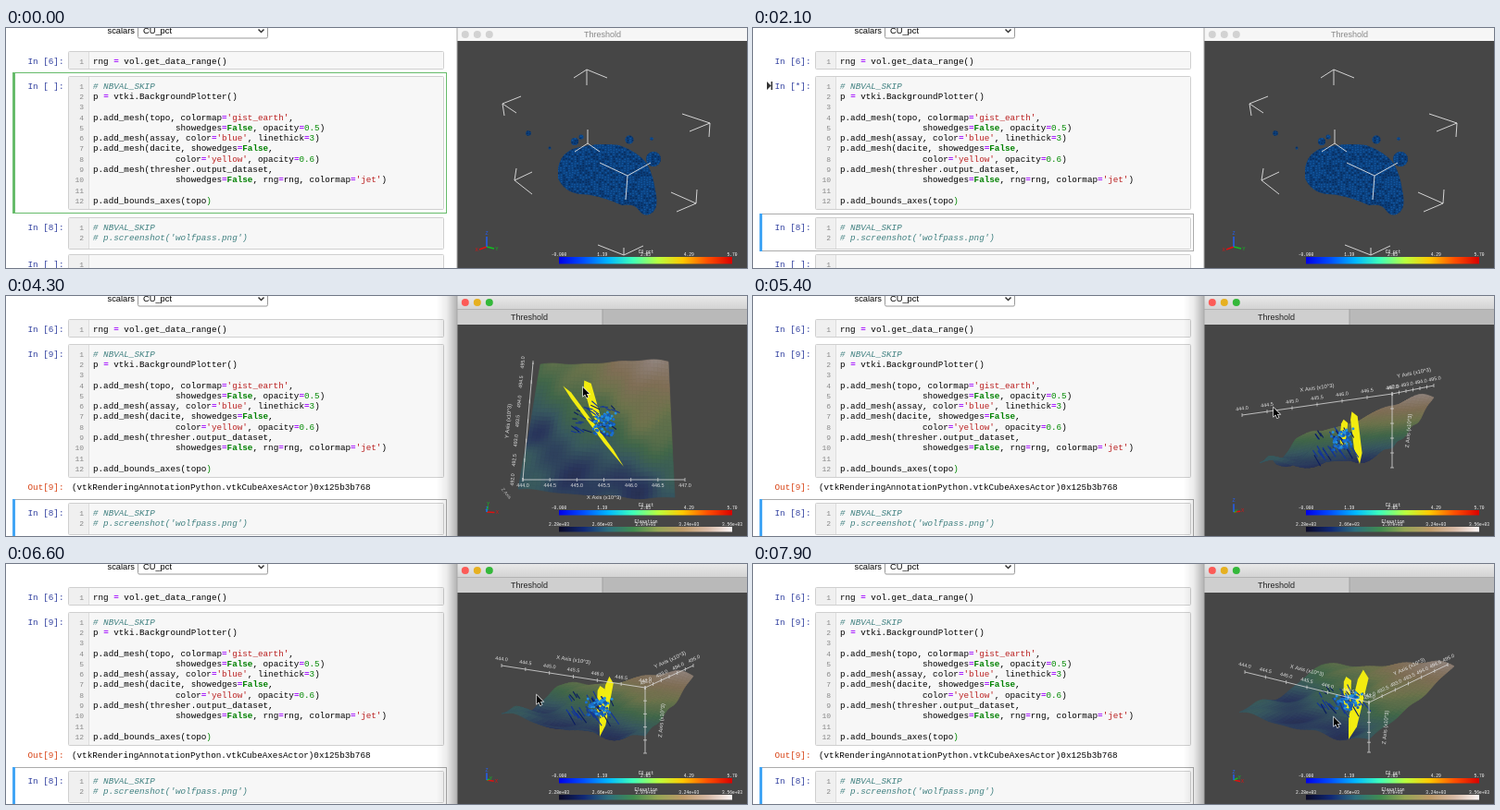
Recreate the animation shown at these times as an HTML page with a canvas. Size 800 by 260 pixels, loop 8 s.

```html
<!DOCTYPE html>
<html lang="en">
<head>
<meta charset="utf-8">
<title>Notebook and 3D plot</title>
<style>
html, body { margin: 0; width: 100%; height: 100%; overflow: hidden; background: #fff; }
svg, canvas { position: absolute; left: 0; top: 0; width: 800px; height: 260px; }
text { white-space: pre; font: 9.27px "Liberation Mono", monospace; }
.ui { font: 9.3px "Liberation Sans", sans-serif; }
.num { font-size: 8px; fill: #888; text-anchor: end; }
.prompt { fill: #303f9f; text-anchor: end; }
.comment { fill: #408080; font-style: italic; }
.string { fill: #ba2121; }
.op { fill: #a2f; font-weight: bold; }
.word { fill: #008000; font-weight: bold; }
.digit, .match { fill: #080; }
</style>
</head>
<body>
<svg id="page" viewBox="0 0 800 260"></svg>
<canvas id="view" width="800" height="260"></canvas>
<script>
const LOOP = 8000, RUN = 500, DONE = 2500, TAB = 2800, FOCUS = 3700;
const page = document.getElementById('page');
const ctx = document.getElementById('view').getContext('2d');
const get = id => document.getElementById(id);
const clamp = (x, a = 0, b = 1) => Math.min(b, Math.max(a, x));
const mix = (a, b, w) => Array.isArray(a) ? a.map((v, i) => mix(v, b[i], w)) : a + (b - a) * w;

// ---------- notebook ----------
function highlight(line) {
  if (line[0] === '#') return `<tspan class="comment">${line}</tspan>`;
  const rule = /('[^']*')|(=)|(\bFalse\b)|(\b\d+(?:\.\d+)?\b)/g;
  const kinds = ['string', 'op', 'word', 'digit'];
  return line.replace(rule, (m, ...g) =>
    `<tspan class="${kinds[g.findIndex(x => x)]}">${m}</tspan>`);
}

function cell(top, height, lines, prompt, id) {
  const base = top + 13.8;
  let s = `<rect x="67.5" y="${top + .5}" width="405" height="${height}" rx="1" fill="#f7f7f7" stroke="#cfcfcf"/>
    <rect x="68" y="${top + 1}" width="21" height="${height - 1}" fill="#f0f0f0"/>
    <path d="M89.5 ${top + 1}v${height - 1}" stroke="#ddd"/>
    <text class="prompt" x="62.5" y="${base}" ${id ? `id="${id}"` : ''}>${prompt}</text>`;
  lines.forEach((line, i) => {
    const y = base + i * 11.28;
    s += `<text class="num" x="84" y="${y}">${i + 1}</text><text x="94" y="${y}">${highlight(line)}</text>`;
  });
  return s;
}

const pad = ' '.repeat(16);
const code = [
  '# NBVAL_SKIP', 'p = vtki.BackgroundPlotter()', '',
  "p.add_mesh(topo, colormap='gist_earth',", pad + 'showedges=False, opacity=0.5)',
  "p.add_mesh(assay, color='blue', linethick=3)",
  'p.add_mesh(dacite, showedges=False,', pad + "color='yellow', opacity=0.6)",
  'p.add_mesh(thresher.output_dataset,', pad + "showedges=False, rng=rng, colormap='jet')",
  '', 'p.add_bounds_axes(topo<tspan class="match">)</tspan>'
];
// the last line carries its own markup, so it bypasses the highlighter's "=" rule
const lastLine = code.pop();

page.innerHTML = `
  <rect width="800" height="260" fill="#fff"/>
  <text class="ui" x="109.5" y="6">scalars</text>
  <rect x="142.5" y="-10" width="140" height="21" rx="1.5" fill="#fff" stroke="#999"/>
  <text class="ui" x="148" y="6">CU_pct</text>
  <path d="M272.5 1.5l3 3 3-3" fill="none" stroke="#333" stroke-width="1.5"/>
  <g id="editing"><rect x="7.5" y="48.5" width="468" height="152" fill="none" stroke="#66bb6a"/>
    <rect x="7" y="48" width="3" height="153" fill="#66bb6a"/></g>
  ${cell(25, 19, ['rng = vol.get_data_range()'], 'In [6]:')}
  ${cell(52, 144, [...code, ''], 'In [ ]:', 'state')}
  <text x="94" y="189.9">${lastLine}</text>
  <path id="runIcon" d="M15 58v9l4.5-4.5zM19.5 58h1.5v9h-1.5z" fill="#333"/>
  <g id="output"><text x="62.5" y="210" text-anchor="end" fill="#d84315">Out[9]:</text>
    <text x="71" y="210">(vtkRenderingAnnotationPython.vtkCubeAxesActor)0x125b3b768</text></g>
  <g id="below">
    <g id="selected"><rect x="7.5" y="201.5" width="468" height="40" fill="none" stroke="#ababab"/>
      <rect x="7" y="201" width="3" height="41" fill="#42a5f5"/></g>
    ${cell(205, 34, ['# NBVAL_SKIP', "# p.screenshot('wolfpass.png')"], 'In [8]:')}
    ${cell(245, 24, [''], 'In [ ]:')}
  </g>`;

const show = (id, on) => get(id).setAttribute('display', on ? 'inline' : 'none');

function drawNotebook(t, mouse) {
  const ran = t >= RUN, done = t >= DONE;
  show('editing', !ran);
  show('selected', ran);
  show('output', done);
  show('runIcon', ran && mouse[0] < 477);
  get('state').textContent = `In [${done ? 9 : ran ? '*' : ' '}]:`;
  get('below').setAttribute('transform', `translate(0 ${done ? 19 : 0})`);
}

// ---------- canvas helpers ----------
function fill(color, x, y, w, h) { ctx.fillStyle = color; ctx.fillRect(x, y, w, h); }

function polygon(color, pts) {
  ctx.fillStyle = color;
  ctx.beginPath();
  pts.forEach(p => ctx.lineTo(p[0], p[1]));
  ctx.closePath();
  ctx.fill();
}

function stroke(color, width, ...pts) {
  ctx.strokeStyle = color;
  ctx.lineWidth = width;
  ctx.beginPath();
  pts.forEach(p => ctx.lineTo(p[0], p[1]));
  ctx.stroke();
}

function dot(x, y, r, color) {
  ctx.fillStyle = color;
  ctx.beginPath();
  ctx.arc(x, y, r, 0, 7);
  ctx.fill();
}

function label(s, x, y, size = 6, color = '#e4e4e4', angle = 0) {
  ctx.save();
  ctx.translate(x, y);
  ctx.rotate(angle);
  ctx.font = `${size}px "Liberation Sans", sans-serif`;
  ctx.textAlign = 'center';
  ctx.textBaseline = 'middle';
  ctx.fillStyle = color;
  ctx.fillText(s, 0, 0);
  ctx.restore();
}

function ramp(colors, x0, y0, x1, y1) {
  const g = ctx.createLinearGradient(x0, y0, x1, y1);
  colors.forEach((c, i) => g.addColorStop(i / (colors.length - 1), c));
  return g;
}

function random(seed) {
  return () => (seed = seed * 16807 % 2147483647) / 2147483647;
}

// ---------- colour maps ----------
const earth = [[10, 10, 40], [16, 40, 118], [45, 110, 125], [64, 140, 80],
  [150, 165, 85], [190, 155, 105], [215, 185, 165], [250, 245, 245]];
const earthCss = earth.map(c => `rgb(${c})`);
const jet = ['#0000e8', '#0050ff', '#00b8ff', '#40ffb8', '#b8ff40', '#ffc800', '#ff5000', '#d80000'];

function earthColor(h) {
  const s = clamp(h) * (earth.length - 1), i = Math.min(earth.length - 2, Math.floor(s));
  return `rgb(${mix(earth[i], earth[i + 1], s - i).map(c => Math.round(c * .5 + 33))})`;
}

function colorBar(y, h, colors, title, ticks) {
  fill(ramp(colors, 597, 0, 784, 0), 597, y, 187, h);
  ctx.font = '4.6px "Liberation Mono", monospace';
  ctx.textAlign = 'center';
  ctx.textBaseline = 'alphabetic';
  ctx.fillStyle = '#fff';
  ctx.fillText(title, 691, y - 4.2);
  ticks.forEach((s, i) => ctx.fillText(s, 597 + i * 46.75, y - 1));
}
const gradeBar = (y, h) => colorBar(y, h, jet, 'CU_pct', ['-0.000', '1.39', '2.85', '4.29', '5.70']);

function triad(x, y, dirs) {
  [['#e01010', 'X'], ['#10c020', 'Y'], ['#2060ff', 'Z']].forEach(([color, name], i) => {
    const [dx, dy] = dirs[i];
    stroke(color, 1.4, [x, y], [x + dx, y + dy]);
    label(name, x + dx * 1.35, y + dy * 1.35, 5, color);
  });
}

// ---------- window frame ----------
function drawFrame(tabs, focused) {
  if (focused) fill(ramp(['rgba(0,0,0,0)', 'rgba(0,0,0,.08)', 'rgba(0,0,0,.3)'], 465, 0, 487, 0), 465, 0, 22, 260);
  fill('#464646', 487, 0, 313, 260);
  fill(focused ? ramp(['#e9e9e9', '#d3d3d3'], 0, 0, 0, 14) : '#f6f6f6', 487, 0, 313, 14);
  const lights = focused ? ['#fc5b57', '#e6b020', '#34b83a'] : ['#d2d2d2', '#d2d2d2', '#d2d2d2'];
  lights.forEach((c, i) => dot(495.8 + i * 13, 7, 4, c));
  if (tabs) {
    fill(focused ? '#cfcfcf' : '#e6e6e6', 487, 14, 157, 17);
    fill(focused ? '#b9b9b9' : '#dadada', 644, 14, 156, 17);
    fill(focused ? '#a6a6a6' : '#c8c8c8', 487, 14, 313, .7);
    fill(focused ? '#a0a0a0' : '#c4c4c4', 643.5, 14, 1, 17);
  }
  label('Threshold', tabs ? 565 : 644, tabs ? 23.6 : 7.8, 9, focused ? '#222' : '#888');
  stroke('#a8a8a8', 1, [487, 0], [487, 260]);
}

// ---------- threshold scene ----------
const corners = [
  [627, 45, -14, 9, 22, 9, 0, 17], [536, 82, 20, -8, 15, 10, 2, 13],
  [760, 103, -30, -10, -22, 9, -1, 15], [549, 165, 2, -13, 19, -9, 19, 15],
  [745, 190, 1, -15, -27, -12, -21, 9], [628, 125, -14, 9, 13, 9, 0, -15],
  [671, 160, -30, -14, 25, -14, -2, 26], [667, 246, -28, -11, 21, -10, 0, -8]
];

function drawThreshold() {
  const speckle = random(7);
  const blob = new Path2D('M596 153Q598 137 612 131Q636 124 662 127Q682 134 692 147Q699 160 701 176Q705 192 699 199Q690 207 683 197Q678 190 665 192Q638 180 620 180Q603 178 596 163Z');
  for (const [x, y, r] of [[699, 142, 8], [564, 114, 2.8], [614, 123, 4], [621, 118, 2.5], [587, 130, 1.5], [673, 121, 4.5], [697, 120, 1.8]]) {
    const p = new Path2D();
    p.arc(x, y, r, 0, 7);
    blob.addPath(p);
  }
  ctx.save();
  ctx.clip(blob);
  fill('#0b3f7c', 555, 105, 160, 105);
  for (let y = 106; y < 208; y += 2.5)
    for (let x = 556; x < 712; x += 3)
      fill(speckle() < .4 ? '#082a58' : '#1259a4', x + speckle(), y + x % 2 * .6, 1.6, 1.3);
  ctx.restore();
  for (const [x, y, ...d] of corners)
    for (let i = 0; i < 6; i += 2) stroke('#e4e4e4', .9, [x, y], [x + d[i], y + d[i + 1]]);
  triad(519, 237, [[-8, 3], [8, 2], [0, -11]]);
  gradeBar(248, 7.5);
}

// ---------- terrain scene ----------
// box: SW, SE, NE, NW corners; dike: two strips as x0 y0 x1 y1 width
const poses = [
  { t: 3800, low: true, box: [566, 219, 715, 215, 724, 66, 567, 68], drop: 2, mid: [634, 134],
    dike: [601, 88, 666, 181, 12, 632, 86, 662, 170, 11], x: [565, 227, 716, 226], y: [565, 67] },
  { t: 4300, low: true, box: [553, 190, 722, 199, 715, 67, 577, 60], drop: 26, mid: [638, 134],
    dike: [602, 97, 667, 185, 4, 626, 91, 640, 140, 9], x: [558, 199, 733, 199], y: [569, 72] },
  { t: 5400, box: [547, 122, 690, 106, 735, 97, 590, 110], drop: 80, mid: [630, 156],
    dike: [639, 134, 636, 165, 7, 648, 125, 655, 182, 8], x: [528, 129, 690, 106], y: [735, 97] },
  { t: 6600, box: [535, 110, 690, 134, 742, 110, 600, 93], drop: 71, mid: [634, 153],
    dike: [643, 132, 641, 167, 8, 653, 122, 641, 187, 8], x: [535, 110, 690, 134], y: [742, 110] },
  { t: 7900, box: [525, 121, 665, 150, 757, 102, 615, 80], drop: 54, mid: [638, 146],
    dike: [642, 122, 641, 160, 8, 661, 115, 643, 190, 11], x: [531, 117, 665, 150], y: [750, 109] }
];

function poseAt(t) {
  const i = clamp(poses.findIndex(p => p.t > t), 1, poses.length - 1);
  const a = poses[i - 1], b = poses[t >= 7900 ? poses.length - 1 : i];
  const w = clamp((t - a.t) / (b.t - a.t)), near = w < .5 ? a : b;
  const pose = { low: near.low, turning: a.low !== b.low && w > .2 && w < .6 };
  for (const k of ['box', 'drop', 'mid', 'dike', 'x']) pose[k] = mix(a[k], b[k], w);
  pose.y = a.low === b.low ? mix(a.y, b.y, w) : near.y;
  return pose;
}

function elevation(u, v) {
  const bump = (a, b, s) => Math.exp(-((u - a) ** 2 + (v - b) ** 2) / s);
  return clamp(.27 + .2 * v + .18 * u * v + .26 * bump(.85, 1, .06)
    + .08 * bump(.45, .9, .03) + .1 * bump(.85, .55, .06)
    - .2 * bump(.05, .5, .04) - .18 * bump(.4, .2, .05) - .14 * bump(.75, .1, .03)
    + .025 * Math.sin(14 * u + 6 * v) + .02 * Math.sin(23 * u - 19 * v));
}

function drawSurface({ box, drop }) {
  const n = 36, [sw, se, ne, nw] = [0, 2, 4, 6].map(i => box.slice(i, i + 2));
  const grid = Array.from({ length: n + 1 }, (_, j) => Array.from({ length: n + 1 }, (_, i) => {
    const u = i / n, v = j / n, h = elevation(u, v);
    const [x, y] = mix(mix(sw, se, u), mix(nw, ne, u), v);
    return [x, y + (1 - h) * drop, h];
  }));
  ctx.lineWidth = .7;
  for (let j = n - 1; j >= 0; j--)
    for (let i = 0; i < n; i++) {
      const quad = [grid[j][i], grid[j][i + 1], grid[j + 1][i + 1], grid[j + 1][i]];
      const color = earthColor(quad.reduce((s, p) => s + p[2], 0) / 4);
      polygon(color, quad);
      ctx.strokeStyle = color;
      ctx.stroke();
    }
}

// strip with pointed ends
function strip(x0, y0, x1, y1, width) {
  const len = Math.hypot(x1 - x0, y1 - y0), nx = (y0 - y1) / len, ny = (x1 - x0) / len;
  const at = (s, side) => [mix(x0, x1, s) + nx * side * width / 2, mix(y0, y1, s) + ny * side * width / 2];
  polygon('#f2ec10', [at(0, .4), at(.15, 1), at(.7, 1), at(1, 0), at(.8, -1), at(.1, -1)]);
}

function drawOre({ dike, mid, drop }, ex, ey) {
  strip(...dike.slice(0, 5));
  strip(...dike.slice(5));
  const rnd = random(41), off = s => (rnd() - .5) * s;
  const at = (a, b, c) => [mid[0] + a * ex[0] + b * ey[0], mid[1] + a * ex[1] + b * ey[1] + c * drop];
  for (let i = 0; i < 34; i++) {
    const [a, b, c] = [off(.24) - .04, off(.27), off(.35)], l = .02 + rnd() * .04;
    stroke(i % 3 ? '#12349c' : '#0a1c60', 1.1, at(a, b, c), at(a + l, b - off(.04), c + l * 3));
  }
  for (let i = 0; i < 70; i++) {
    const [a, b, c] = [off(.13) + .05, off(.15) - .03, off(.25)];
    dot(...at(a, b, c), 1.5, ['#1a6fd0', '#1458b0', '#2490e0'][i % 3]);
  }
}

function axis(p, q, from, title, labelOff, titleOff, angle) {
  const step = Math.hypot(q[0] - p[0], q[1] - p[1]) < 90 ? 2 : 1;
  stroke('#dcdcdc', .8, p, q);
  for (let i = 0; i <= 6; i++) {
    const [x, y] = mix(p, q, i / 6);
    stroke('#dcdcdc', .7, [x, y - 2], [x, y + 2]);
    if (i % step === 0) label((from + i / 2).toFixed(1), x + labelOff[0], y + labelOff[1], 5.4, undefined, angle);
  }
  const [x, y] = mix(p, q, .5);
  label(title + ' Axis (x10^3)', x + titleOff[0], y + titleOff[1], 5.8, undefined, angle);
}

function drawAxes({ low, turning, x, y, drop }) {
  const a = x.slice(0, 2), b = x.slice(2), slope = (p, q) => Math.atan2(q[1] - p[1], q[0] - p[0]);
  axis(a, b, 444, 'X', [0, low ? 7 : -7], [0, low ? 19 : -18], slope(a, b));
  if (turning) return;
  if (low) {
    axis(a, y, 492, 'Y', [-11, 0], [-21, 0], slope(a, y));
    label('Z Axis', a[0] - 18, a[1] + 15, 5, '#bbb', .9);
    return;
  }
  axis(b, y, 492, 'Y', [1, -7], [1, -18], slope(b, y));
  stroke('#dcdcdc', .8, b, [b[0], b[1] + drop]);
  for (let i = 1; i <= 5; i++) stroke('#dcdcdc', .7, [b[0] - 2, b[1] + drop * i / 5], [b[0] + 2, b[1] + drop * i / 5]);
  label('Z Axis (x10^3)', b[0] + 18, b[1] + drop / 2, 5.8, undefined, -Math.PI / 2 + .08);
}

function drawTerrain(t) {
  const pose = poseAt(t), b = pose.box;
  const ex = [b[2] - b[0], b[3] - b[1]], ey = [b[6] - b[0], b[7] - b[1]];
  drawSurface(pose);
  drawOre(pose, ex, ey);
  drawAxes(pose);
  triad(519, 234, [ex.map(v => v * .05), ey.map(v => v * .05), [0, -pose.drop * .11]]);
  gradeBar(232, 5.5);
  colorBar(250, 5.5, earthCss, 'Elevation', ['2.28e+03', '2.66e+03', '2.97e+03', '3.24e+03', '3.56e+03']);
}

// ---------- pointer ----------
const track = [[3200, 353, 156], [3600, 620, 92], [4300, 623, 99], [5400, 562, 121], [6600, 573, 142], [7900, 627, 166]];

function mouseAt(t) {
  const i = track.findIndex(k => k[0] > t);
  if (i === 0) return track[0].slice(1);
  if (i < 0) return track[track.length - 1].slice(1);
  const a = track[i - 1], b = track[i];
  return mix(a, b, (t - a[0]) / (b[0] - a[0])).slice(1);
}

function drawMouse([x, y]) {
  if (x < 477) {
    stroke('#333', 1, [x, y - 4], [x, y + 4]);
    for (const d of [-4, 4]) stroke('#333', 1, [x - 2, y + d], [x + 2, y + d]);
    return;
  }
  const arrow = new Path2D(`M${x} ${y}v9.5l2.2-2 1.7 3.8 1.7-.8-1.7-3.6h3z`);
  ctx.fillStyle = '#000';
  ctx.strokeStyle = '#fff';
  ctx.lineWidth = 1.2;
  ctx.stroke(arrow);
  ctx.fill(arrow);
}

// ---------- loop ----------
function render(time) {
  const t = Math.floor(time % LOOP / 100) * 100, mouse = mouseAt(t);
  drawNotebook(t, mouse);
  ctx.clearRect(0, 0, 800, 260);
  drawFrame(t >= TAB, t >= FOCUS);
  if (t < TAB) drawThreshold();
  else if (t > TAB) drawTerrain(t);
  if (t > TAB) drawMouse(mouse);
}

const start = performance.now();
function tick() {
  render(performance.now() - start);
  requestAnimationFrame(tick);
}
tick();
</script>
</body>
</html>
```
